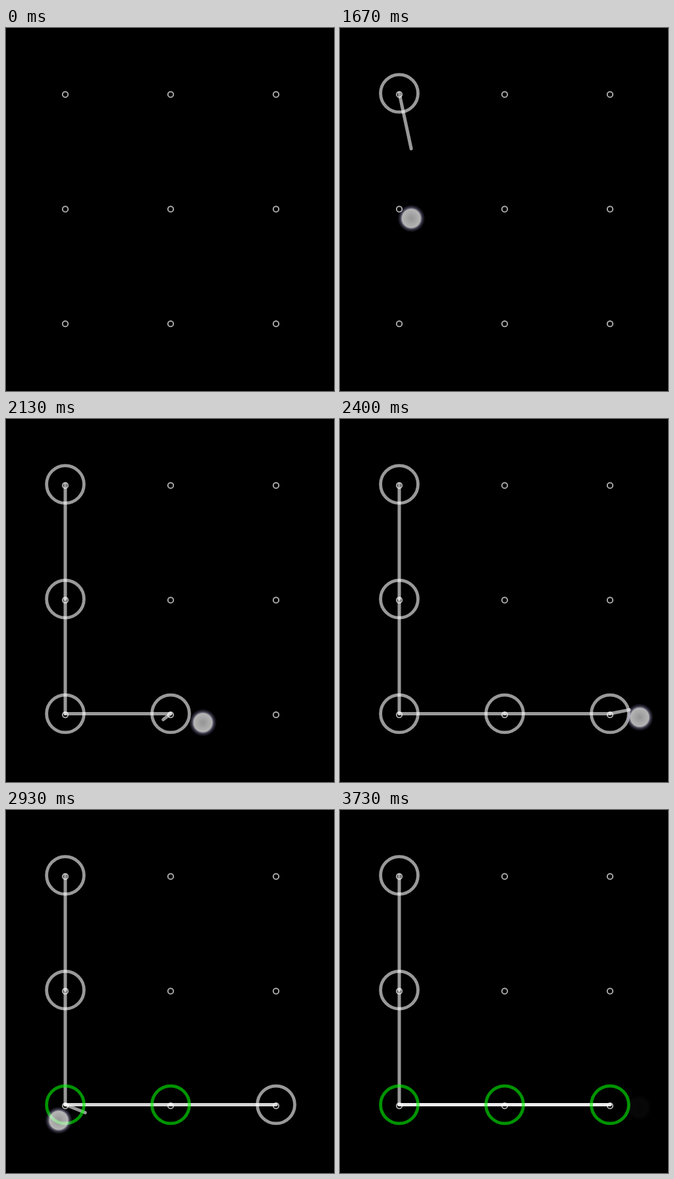
An HTML page with a canvas for the animation above (3.79 s loop, 498x550 px).

```html
<!DOCTYPE html>
<html lang="en">
<head>
<meta charset="utf-8">
<title>Pattern lock</title>
<style>
  html, body { margin: 0; width: 100%; height: 100%; overflow: hidden; background: #000; }
  canvas { display: block; }
</style>
</head>
<body>
<canvas id="stage" width="498" height="550"></canvas>
<script>
const ctx = document.getElementById('stage').getContext('2d');
const LOOP = 3790;
const DOWN = 22, UP = 53;   // steps at which the finger lands and lifts
const REACH = 34;           // how close the trail must come to catch a node
const WHITE = 'rgba(255,255,255,.6)';
const GREEN = 'rgba(0,255,0,.58)';

const NODES = Array.from({ length: 9 }, (_, i) => ({
  x: 90 + 160 * (i % 3),
  y: 99 + 173.75 * Math.floor(i / 3)
}));

// Turning points and pauses of the finger: step, x, y
const PATH = [
  [DOWN, 108, 94], [28, 109, 483], [29, 125, 483], [32, 299, 460],
  [36, 455, 452], [39, 291, 471], [40, 278, 471], [44.5, 74, 470],
  [48, 362, 451], [49, 385, 451], [UP, 454, 451]
];

// Steps run at 15 per second, rounded to 10 ms
function stepAt(ms) {
  const n = Math.round(ms * 0.015);
  return Math.round(n * 20 / 3) * 10 > ms ? n - 1 : n;
}

const slope = (i, c) => (PATH[i + 1][c] - PATH[i][c]) / (PATH[i + 1][0] - PATH[i][0]);

// Monotone tangent: zero at the ends and wherever the direction turns
function tangent(i, c) {
  if (i === 0 || i === PATH.length - 1) return 0;
  const a = slope(i - 1, c), b = slope(i, c);
  return a * b > 0 ? 2 * a * b / (a + b) : 0;
}

function finger(step) {
  const n = Math.min(Math.max(step, DOWN), UP);
  const i = Math.max(PATH.findIndex(k => k[0] >= n) - 1, 0);
  const d = PATH[i + 1][0] - PATH[i][0];
  const u = (n - PATH[i][0]) / d, v = 1 - u;
  const at = c => v * v * (1 + 2 * u) * PATH[i][c] + u * u * (3 - 2 * u) * PATH[i + 1][c] +
    u * v * d * (v * tangent(i, c) - u * tangent(i + 1, c));
  return { x: at(1), y: at(2) };
}

// The line follows one step behind, a little above the finger
function trail(n) {
  const p = finger(n - 1);
  return { x: p.x, y: p.y - 12 };
}

function caught(n) {
  const hits = [];
  for (let k = DOWN; k <= n; k++) {
    const t = trail(k);
    const node = NODES.find(p => Math.hypot(p.x - t.x, p.y - t.y) < REACH);
    if (node && node !== hits[hits.length - 1]) hits.push(node);
  }
  return hits;
}

function ring(x, y, r, width, color) {
  ctx.beginPath();
  ctx.arc(x, y, r, 0, 2 * Math.PI);
  ctx.lineWidth = width;
  ctx.strokeStyle = color;
  ctx.stroke();
}

function line(a, b) {
  ctx.beginPath();
  ctx.moveTo(a.x, a.y);
  ctx.lineTo(b.x, b.y);
  ctx.lineWidth = 5;
  ctx.lineCap = 'round';
  ctx.strokeStyle = WHITE;
  ctx.stroke();
}

function disc({ x, y }, alpha) {
  const r = 21;
  const g = ctx.createRadialGradient(x, y, 0, x, y, r);
  g.addColorStop(0, 'rgba(255,255,255,.58)');
  g.addColorStop(0.66, 'rgba(255,255,255,.71)');
  g.addColorStop(0.74, 'rgba(225,220,255,.42)');
  g.addColorStop(0.84, 'rgba(200,190,255,.2)');
  g.addColorStop(1, 'rgba(180,170,255,0)');
  ctx.globalAlpha = alpha;
  ctx.fillStyle = g;
  ctx.fillRect(x - r, y - r, 2 * r, 2 * r);
  ctx.globalAlpha = 1;
}

function draw(n) {
  ctx.fillStyle = '#000';
  ctx.fillRect(0, 0, 498, 550);
  for (const p of NODES) ring(p.x, p.y + 1.7, 4.2, 1.9, '#adadad');
  if (n < DOWN) return;

  const hits = caught(n);
  hits.slice(1).forEach((p, i) => line(hits[i], p));
  if (n > DOWN && n <= UP) line(hits[hits.length - 1], trail(n));

  // A node caught twice turns green
  for (const p of new Set(hits)) {
    const again = hits.indexOf(p) !== hits.lastIndexOf(p);
    ring(p.x, p.y, 28.4, 4.8, again ? GREEN : WHITE);
  }

  disc(finger(n), Math.min(1, Math.max(0.04, 1 - (n - UP) * 0.34)));
}

function tick() {
  draw(stepAt(performance.now() % LOOP));
  requestAnimationFrame(tick);
}
tick();
</script>
</body>
</html>
```
